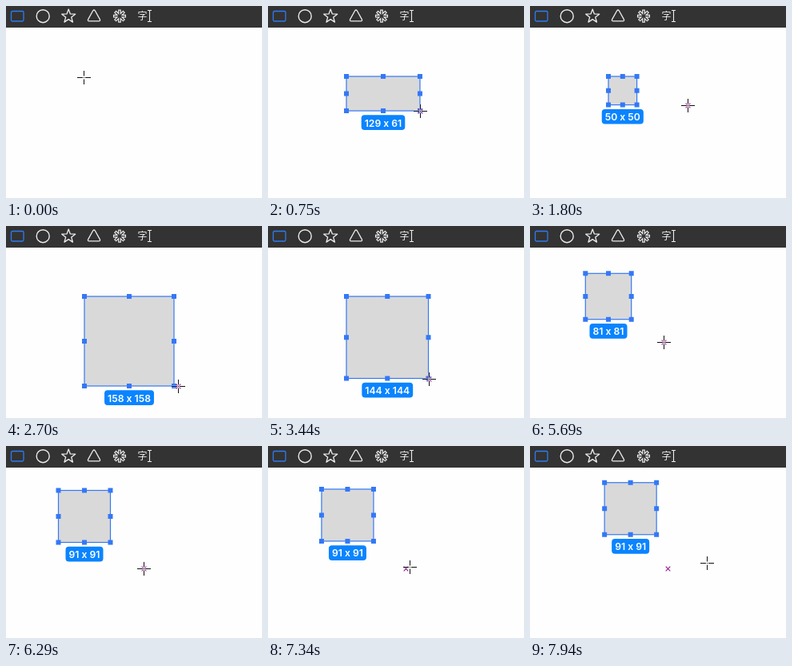
Animation of 320 by 240 pixels, one loop 8 s. Source, as an HTML page:

```html
<!DOCTYPE html>
<html lang="en">
<head>
<meta charset="utf-8">
<title>Drawing a rectangle</title>
<style>
  html, body { margin: 0; width: 100%; height: 100%; overflow: hidden; background: #fefefe; }
  svg { display: block; width: 100%; height: 100%; }
  .icons { fill: none; stroke: #ececec; stroke-width: 1.3; stroke-linejoin: round; }
  .glyph { font: 500 12px "Noto Sans CJK SC", "Noto Sans CJK JP", "Noto Sans CJK", sans-serif; fill: #ececec; }
  .size { font: 600 12.2px Inter, sans-serif; fill: #fff; text-anchor: middle; }
</style>
</head>
<body>
<svg viewBox="0 0 320 240" xmlns="http://www.w3.org/2000/svg">
  <rect width="320" height="240" fill="#fefefe"/>
  <rect width="320" height="27" fill="#333"/>
  <g class="icons">
    <rect x="6.5" y="6.5" width="15.5" height="12.5" rx="1.5" stroke="#2f7bf0"/>
    <circle cx="46.2" cy="12.7" r="8" stroke-width="1.4"/>
    <path id="star"/>
    <path d="M108.6 6Q110 4 111.4 6L117.3 16.6Q118.3 18.8 116 18.8H104Q101.7 18.8 102.7 16.6Z"/>
    <path class="spokes" stroke-width="3.7" stroke-linecap="square"/>
    <path class="spokes" stroke-width="1.4" stroke-linecap="square" stroke="#333"/>
    <path d="M179.5 5.500V19.500M177 5.500H182M177 19.500H182" stroke-width="1.1"/>
  </g>
  <text class="glyph" x="164.5" y="16.8">字</text>

  <g id="shape">
    <rect id="box" fill="#d9d9d9" stroke="#3478f6" stroke-width="1.2"/>
    <path id="handles" fill="#3478f6"/>
    <rect id="tag" height="18.7" rx="4" fill="#0a84ff"/>
    <text id="size" class="size"></text>
    <path id="anchor" d="M-2.8 -2.8L2.8 2.8M-2.8 2.8L2.8 -2.8" stroke="#93198f" stroke-width="1.1"/>
  </g>
  <g id="cursor">
    <path d="M-8.5 0H8.5M0 -8.500V8.500" stroke="#fff" stroke-opacity=".7" stroke-width="2"/>
    <path d="M-8.5 0H-1.500M1.5 0H8.500M0 -8.500V-2M0 2V8.500M-.5 0H.5" stroke="#111"/>
  </g>
</svg>
<script>
const LOOP = 8000, TICK = 150, UNIT = 0.711;
const DRAG_AT = 150, SQUARE_AT = 1800, CENTER_AT = 4640, CIRCLE_AT = 7340;
const origin = [98, 88];
const grip = [172, 153];

const smooth = u => u * u * (3 - 2 * u);
const out = u => u * (2 - u);

// Pointer drags: each goes on from the end of the one before, bowed by "bend".
const drags = [
  { at: DRAG_AT, steps: 6, ease: smooth, to: [197.4, 123.6], bend: [0, 20] },
  { at: 2100, steps: 5, ease: smooth, to: [215, 200], bend: [4, 0] },
  { at: 2840, steps: 5, ease: out, to: [201.4, 190.5], bend: [-2, -1] },
  { at: 4940, steps: 10, ease: out, to: grip, bend: [-10.2, -14.3] }
];

const $ = id => document.getElementById(id);
const set = (el, attrs) => { for (const k in attrs) el.setAttribute(k, attrs[k]); };
const mix = (a, b, u) => a + (b - a) * u;
const polar = (cx, cy, r, a) => [cx + r * Math.sin(a), cy - r * Math.cos(a)];
const ticks = (t, at) => Math.floor((t - at) / TICK);

function drawIcons() {
  const star = Array.from({ length: 10 }, (_, i) =>
    polar(78.2, 12.9, i % 2 ? 3.7 : 8.9, i * Math.PI / 5));
  set($('star'), { d: 'M' + star.join('L') + 'Z' });
  const spokes = Array.from({ length: 4 }, (_, i) => {
    const a = i * Math.PI / 4;
    return 'M' + polar(142, 12.6, 6.2, a) + 'L' + polar(142, 12.6, -6.2, a);
  }).join('');
  document.querySelectorAll('.spokes').forEach(el => set(el, { d: spokes }));
}

function dragPoint(t) {
  let p = [97, 89];
  for (const { at, steps, ease, to, bend } of drags) {
    if (t < at) break;
    const u = Math.min(1, (ticks(t, at) + 1) / steps);
    p = p.map((v, i) => mix(v, to[i], ease(u)) + bend[i] * Math.sin(Math.PI * u));
  }
  return p;
}

// One widening clockwise turn, in four ticks.
function spiral(t, r0, r1, a0, a1) {
  const u = ticks(t, CIRCLE_AT) / 4;
  return polar(190, 180, mix(r0, r1, u), mix(a0, a1, u));
}

const pointerAt = t => t < CIRCLE_AT ? dragPoint(t) : spiral(t, 31.8, 46, -0.42, 7.02);

function boxAt(t) {
  const [px, py] = t < CIRCLE_AT ? dragPoint(t) : grip;
  let [x, y] = origin;
  let w = px - x, h = py - y;
  if (t >= SQUARE_AT) w = h = Math.min(w, h);
  if (t >= CENTER_AT) { x -= w / 2; y -= h / 2; }
  if (t >= CIRCLE_AT) {
    // The box trails the pointer on a tighter turn.
    const [sx, sy] = spiral(t, 33, 38, -0.525, 6.54);
    x += sx - grip[0];
    y += sy - grip[1];
  }
  return { x, y, w, h };
}

function handlePath({ x, y, w, h }) {
  let d = '';
  for (const i of [0, 0.5, 1]) for (const j of [0, 0.5, 1]) {
    const crowded = i === 0.5 && w < 16 || j === 0.5 && h < 16;
    if (crowded || i === 0.5 && j === 0.5) continue;
    d += `M${x + w * i - 3} ${y + h * j - 3}h6v6h-6z`;
  }
  return d;
}

function drawBox(b) {
  const mid = b.x + b.w / 2, top = b.y + b.h + 5.3;
  set($('box'), { x: b.x, y: b.y, width: b.w, height: b.h });
  set($('handles'), { d: handlePath(b) });
  const label = $('size');
  label.textContent = `${Math.round(b.w / UNIT)} x ${Math.round(b.h / UNIT)}`;
  set(label, { x: mid, y: top + 14.2 });
  const width = label.getComputedTextLength() + 8;
  set($('tag'), { x: mid - width / 2, y: top, width });
}

function place(id, p) {
  const [x, y] = p.map(v => Math.round(v) + 0.5);
  set($(id), { transform: `translate(${x} ${y})` });
}

function render(t) {
  const dragging = t >= DRAG_AT;
  $('shape').style.display = dragging ? '' : 'none';
  if (dragging) drawBox(boxAt(t));
  place('anchor', t < CIRCLE_AT ? dragPoint(t) : grip);
  place('cursor', pointerAt(t));
}

drawIcons();
const start = performance.now();
function frame() {
  render((performance.now() - start) % LOOP);
  requestAnimationFrame(frame);
}
frame();
</script>
</body>
</html>
```
